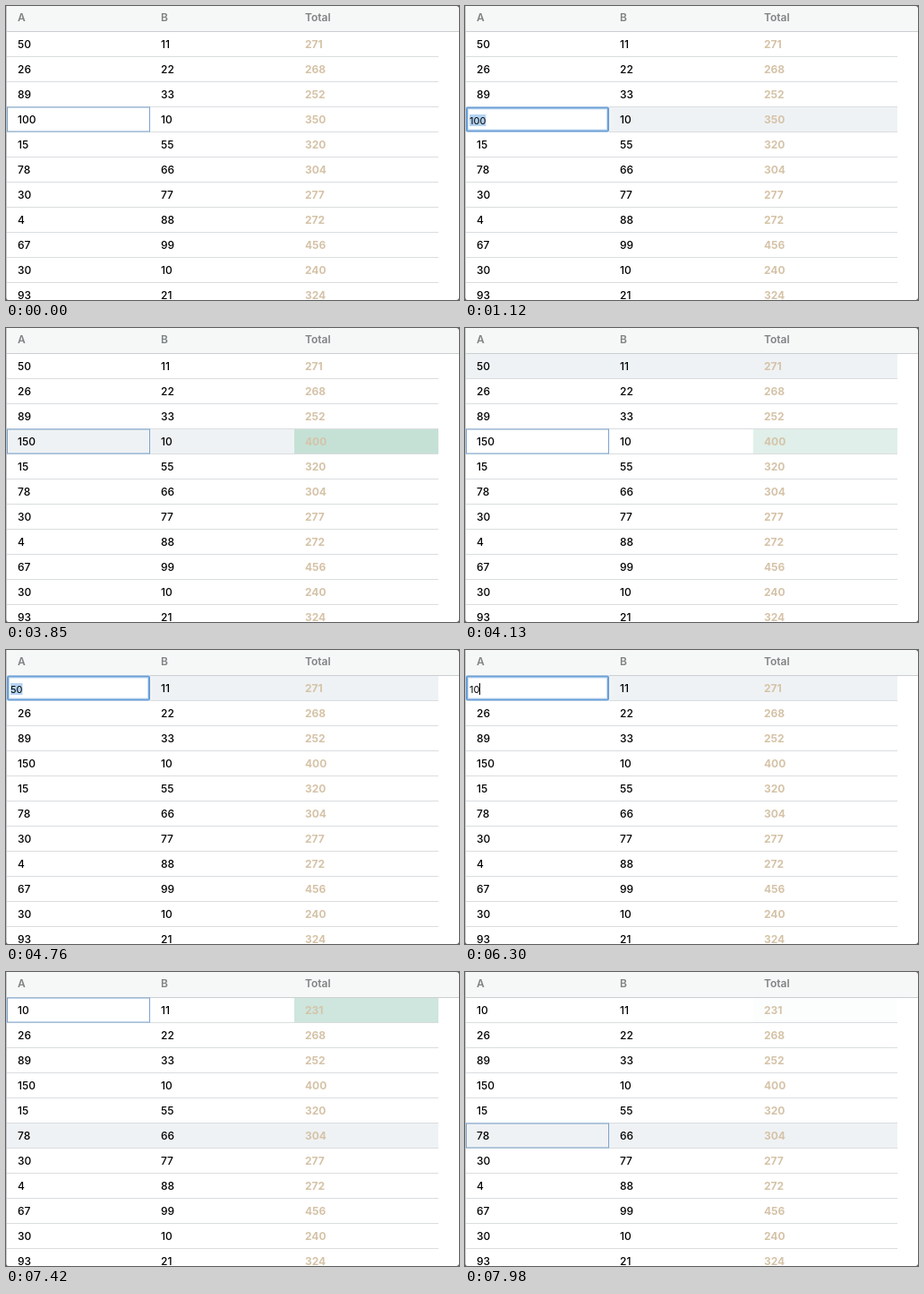
An HTML page for the animation above (8 s loop, 506 by 328 pixels).

```html
<!DOCTYPE html>
<html lang="en">
<head>
<meta charset="utf-8">
<title>Editable grid</title>
<style>
  html, body { margin: 0; width: 100%; height: 100%; overflow: hidden; background: #fff; }
  svg { display: block; width: 506px; height: 328px; }
  text { font: 500 12px Inter, "Liberation Sans", sans-serif; fill: #000; white-space: pre; }
  .head { font-weight: 600; fill: #7f8283; }
  .total { font-weight: 700; fill: #d5c3a8; }
  .edit { font-weight: 400; font-size: 11px; }
</style>
</head>
<body>
<svg id="stage" viewBox="0 0 506 328"></svg>
<script>
const LOOP = 8000, TOP = 29, ROW = 28, WIDTH = 483;
const COLUMNS = [13, 173, 334];
const FLASH = [197, 225, 214];
const rows = [
  [50, 11, 271], [26, 22, 268], [89, 33, 252], [100, 10, 350], [15, 55, 320], [78, 66, 304],
  [30, 77, 277], [4, 88, 272], [67, 99, 456], [30, 10, 240], [93, 21, 324]
];

// Each track lists [start time, value]; null means nothing is shown.
const hoverTrack = [[0, null], [1120, 3], [3920, 2], [3990, 1], [4060, 0], [7280, 1], [7350, 3], [7420, 5]];
const focusTrack = [[0, 3], [1120, null], [3220, 3], [4480, 0], [4690, null], [6720, 0], [7700, 5]];
const edits = [
  { row: 3, open: 1120, close: 3220, value: 150, total: 400, fade: 3850, caretOff: 3150,
    typed: [[1120, "100"], [2170, "1"], [2450, "15"], [2590, "150"]] },
  { row: 0, open: 4690, close: 6720, value: 10, total: 231, fade: 7280, caretOff: LOOP,
    typed: [[4690, "50"], [6020, "1"], [6160, "10"]] }
];

const stage = document.getElementById("stage");
const valueAt = (track, t) => track.filter(([start]) => start <= t).pop()[1];
const rowY = i => TOP + i * ROW;
const show = (node, visible) => node.setAttribute("visibility", visible ? "visible" : "hidden");

function add(tag, attrs, parent = stage) {
  const node = document.createElementNS("http://www.w3.org/2000/svg", tag);
  for (const key in attrs) node.setAttribute(key, attrs[key]);
  return parent.appendChild(node);
}
const rect = (x, y, width, height, attrs, parent) => add("rect", { x, y, width, height, ...attrs }, parent);
function label(x, y, text, cls, parent) {
  const node = add("text", { x, y, class: cls }, parent);
  node.textContent = text;
  return node;
}

// The standard CSS "ease" curve, solved by bisection.
function ease(x) {
  if (x <= 0 || x >= 1) return x <= 0 ? 0 : 1;
  const bezier = (s, a, b) => 3 * a * s * (1 - s) ** 2 + 3 * b * s * s * (1 - s) + s ** 3;
  let low = 0, high = 1;
  for (let i = 0; i < 24; i++) {
    const mid = (low + high) / 2;
    if (bezier(mid, 0.25, 0.25) < x) low = mid; else high = mid;
  }
  return bezier(low, 0.1, 1);
}

rect(0, 0, 506, 328, { fill: "#fff" });
rect(0, 0, 506, 28, { fill: "#f6f8f8" });
const hover = rect(1, 0, WIDTH - 1, 27, { fill: "#eff2f4" });
const flashes = edits.map(edit => rect(322, rowY(edit.row) - 0.5, 161, 27.5));
rows.forEach((_, i) => rect(1, rowY(i) + 27, WIDTH - 1, 1, { fill: "#dadddf" }));
rect(0, 28, 506, 1, { fill: "#cbcfd1" });
rect(0, 0, 1, 328, { fill: "#c5c7c8" });

["A", "B", "Total"].forEach((name, i) => label(COLUMNS[i], 17, name, "head"));
const cells = rows.map((row, i) =>
  row.map((value, c) => label(COLUMNS[c], rowY(i) + 18, value, c === 2 ? "total" : "")));

const focus = rect(1.5, 0, 159, 27, { fill: "none", stroke: "#7ba3ce" });

const editor = add("g");
rect(1, -0.5, 160, 28, { fill: "#fff" }, editor);
rect(3.5, 2, 155, 23, { fill: "none", stroke: "#c5dcf3" }, editor);
rect(2, 0.5, 158, 26, { fill: "none", stroke: "#6a9fd8", "stroke-width": 2, rx: 1 }, editor);
const selection = rect(5, 8, 0, 13, { fill: "#b4d3f2" }, editor);
const editText = label(5, 19, "", "edit", editor);
const caret = rect(0, 8, 1, 13, { fill: "#000" }, editor);

// Rounded window corners.
add("path", { d: "M0 325V328H3Q0 328 0 325M506 325V328H503Q506 328 506 325M503 0H506V3Q506 0 503 0", fill: "#555" });

function place(node, row) {
  show(node, row !== null);
  if (row !== null) node.setAttribute("transform", `translate(0 ${rowY(row)})`);
}

function render(t) {
  place(hover, valueAt(hoverTrack, t));
  place(focus, valueAt(focusTrack, t));

  edits.forEach((edit, i) => {
    const saved = t >= edit.close;
    const [a, , total] = rows[edit.row];
    cells[edit.row][0].textContent = saved ? edit.value : a;
    cells[edit.row][2].textContent = saved ? edit.total : total;
    const left = 1 - ease((t - edit.fade) / 1000);
    show(flashes[i], saved && left > 0.03);
    flashes[i].setAttribute("fill", `rgba(${FLASH},${left})`);
  });

  const active = edits.find(edit => t >= edit.open && t < edit.close);
  editor.setAttribute("display", active ? "inline" : "none");
  if (!active) return;
  place(editor, active.row);
  const typing = t >= active.typed[1][0];
  editText.textContent = valueAt(active.typed, t);
  const width = editText.getComputedTextLength();
  selection.setAttribute("width", typing ? 0 : width);
  caret.setAttribute("x", Math.round(5 + width));
  caret.setAttribute("width", typing && t < active.caretOff ? 1 : 0);
}

const start = performance.now();
function tick() {
  render((performance.now() - start) % LOOP);
  requestAnimationFrame(tick);
}
tick();
</script>
</body>
</html>
```
